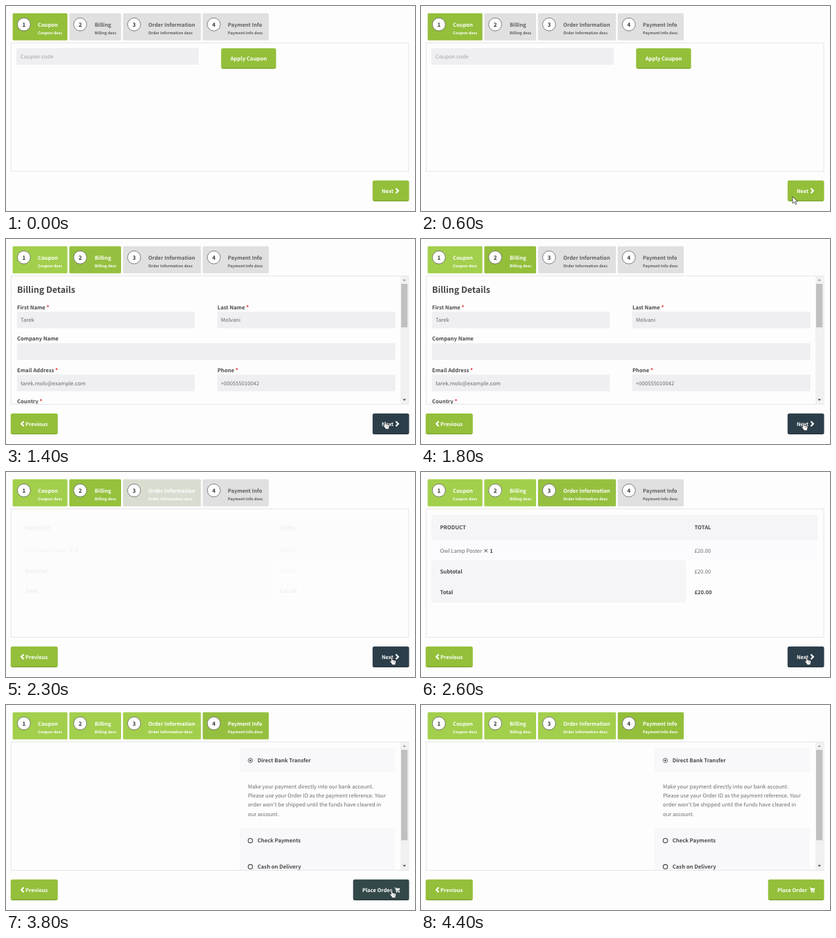
Recreate the animation shown at these times as an HTML page. Size 590 by 297 pixels, loop 5.1 s.

```html
<!DOCTYPE html>
<html lang="en">
<head>
<meta charset="utf-8">
<title>Checkout steps</title>
<style>
  html, body { margin: 0; width: 100%; height: 100%; overflow: hidden; background: #fefdfe; }
  svg { display: block; }
  text {
    font: 7.68px "Noto Sans CJK SC", "Noto Sans CJK JP", "Noto Sans CJK", "Open Sans", sans-serif;
    text-rendering: geometricPrecision; white-space: pre;
  }
  .b { font-weight: 700; }
  .k { font-weight: 900; }
</style>
</head>
<body>
<svg id="stage" width="590" height="297" viewBox="0 0 590 297"></svg>
<script>
const LOOP = 5100, TICK = 100;
const STARTS = [0, 1100, 2300, 3500];
const GREEN = [147, 191, 58], LIGHT = [162, 207, 76], GREY = [225, 224, 225], DARK = [43, 62, 74];
const INK = '#48484a', SOFT = '#6a6a6c';
const TABS = [
  [9.6, 79, 46, 25.8, 'Coupon'],
  [91.3, 74.7, 128, 107, 'Billing'],
  [168.8, 112.4, 205.3, 184.8, 'Order Information'],
  [283.8, 95.2, 320, 299.8, 'Payment Info']
];

const clamp = v => Math.max(0, Math.min(1, v));
const mix = (a, b, p) => `rgb(${a.map((v, i) => Math.round(v + (b[i] - v) * p))})`;
const rgb = c => `rgb(${c})`;
const rect = (x, y, w, h, fill, more = '') =>
  `<rect x="${x}" y="${y}" width="${w}" height="${h}" fill="${fill}" ${more}/>`;
// weight: '' regular, 'b' bold, 'k' black
const text = (x, y, s, fill, weight = '', size = 7.68, more = '') =>
  `<text x="${x}" y="${y}" fill="${fill}" class="${weight}" style="font-size:${size}px" ${more}>${s}</text>`;
const path = (d, fill, more = '') => `<path d="${d}" fill="${fill}" ${more}/>`;

// Piecewise linear value through [time, ...values] points
function along(points, t) {
  const i = points.findIndex(p => p[0] >= t);
  if (i < 0) return points.at(-1).slice(1);
  if (i === 0) return points[0].slice(1);
  const a = points[i - 1], b = points[i], k = (t - a[0]) / (b[0] - a[0]);
  return a.slice(1).map((v, j) => v + (b[j + 1] - v) * k);
}

function tab([x, w, tx, cx, title], i, step, p) {
  let fill = rgb(GREY);
  if (i < step - 1) fill = rgb(LIGHT);
  else if (i === step - 1) fill = mix(GREEN, LIGHT, p);
  else if (i === step) fill = mix(GREY, GREEN, p);
  const ink = i <= step ? '#fff' : '#5c5c5e';
  return rect(x, 10.6, w, 39.2, fill, 'rx="1.5"') +
    `<circle cx="${cx}" cy="26.7" r="9.4" fill="#fefefe" stroke="#626262" stroke-width=".8"/>` +
    text(cx, 29.5, i + 1, '#333', 'b', 8, 'text-anchor="middle"') +
    text(tx, 29.6, title, ink, 'k', 7.5) +
    text(tx, 40.7, title + ' desc', ink, 'k', 5.6);
}

function button(x, y, w, h, fill) {
  return rect(x, y, w, h, fill, 'rx="2.5"') +
    path(`M${x + 2} ${y + h - .6}h${w - 4}`, 'none', 'stroke="#000" stroke-opacity=".15" stroke-width="1.2"');
}

const chevron = (x, dir) =>
  path(`M${x} 264.2l${3.4 * dir} 3.5l${-3.4 * dir} 3.5`, 'none', 'stroke="#fff" stroke-width="2.2"');

const cart = () =>
  path('M560.5 265h1.6l1 4.6h4.4', 'none', 'stroke="#fff"') +
  path('M562.3 265.4h6l-.8 3.2h-4.6z', '#fff') +
  '<circle cx="563.6" cy="271" r=".9" fill="#fff"/><circle cx="567" cy="271" r=".9" fill="#fff"/>';

function scrollbar(h) {
  return rect(569, 54, 12, 185, '#f2f1f2') + rect(570, 65, 9.2, h, '#c0c0c1') +
    path('M572.3 60.5h4.8l-2.4-2.6z', '#999') + path('M572.3 231.8h4.8l-2.4 2.6z', '#555');
}

const coupon = () =>
  rect(15, 61, 263, 24, '#efeef0') + text(21, 76.2, 'Coupon code', '#a3a3a5') +
  button(310.3, 61.3, 79.3, 29.6, rgb(GREEN)) + text(323.7, 79.1, 'Apply Coupon', '#fff', 'b');

function field(x, y, w, label, value) {
  const star = value ? ' <tspan fill="#e02020">*</tspan>' : '';
  return text(x, y, label + star, INK, 'b') +
    rect(x - .3, y + 3.7, w, 24, '#efeef0') + text(x + 5, y + 18.7, value, SOFT);
}

const billing = () =>
  text(16, 78.3, 'Billing Details', '#444446', 'b', 12.4) +
  field(16, 101.7, 256.5, 'First Name', 'Tarek') +
  field(305, 101.7, 257, 'Last Name', 'Molvani') +
  field(16, 147.3, 546, 'Company Name', '') +
  field(16, 192.8, 256.5, 'Email Address', 'tarek.molv@example.com') +
  field(305, 192.8, 257, 'Phone', '+000555010042') +
  field(16, 238.4, 546, 'Country', ' ');

function order() {
  const row = (y, label, total, a, b) => text(27.5, y, label, INK, a) + text(394.5, y, total, b ? INK : SOFT, b);
  return rect(15, 62, 557, 36, '#f5f4f6') + rect(15, 98, 557, 30, '#fbfafc') +
    rect(15, 128, 367, 61, '#f5f4f6') +
    row(83, 'PRODUCT', 'TOTAL', 'b', 'b') +
    row(116.5, `<tspan fill="${SOFT}">Owl Lamp Poster</tspan> <tspan class="b">× 1</tspan>`, '£20.00', '', '') +
    row(146.8, 'Subtotal', '£20.00', 'b', '') +
    row(176.8, 'Total', '£20.00', 'b', 'b');
}

function option(y, label, on) {
  return `<circle cx="352.5" cy="${y}" r="3.2" fill="none" stroke="#444" stroke-width="${on ? .8 : 1.1}"/>` +
    (on ? `<circle cx="352.5" cy="${y}" r="1.4" fill="#555"/>` : '') +
    text(362.8, y + 2.9, label, INK, 'b');
}

const payment = () =>
  rect(337, 62, 224, 36, '#f8f7f9') + rect(337, 178, 224, 70, '#f8f7f9') +
  option(80.3, 'Direct Bank Transfer', true) +
  ['Make your payment directly into our bank account.',
   'Please use your Order ID as the payment reference. Your',
   "order won't be shipped until the funds have cleared in",
   'our account.'].map((s, i) => text(349, 120.7 + i * 13.35, s, SOFT)).join('') +
  option(196.4, 'Check Payments') + option(234.3, 'Cash on Delivery');

const PANELS = [coupon, billing, order, payment];

function cursor(t) {
  if (t < 600 || t >= 4300) return '';
  const [x, y] = along([[600, 536, 276], [900, 544, 265], [1000, 545.5, 264], [1300, 547, 264], [1700, 547, 264],
    [1900, 556.5, 268], [4000, 556.5, 268], [4100, 560, 258], [4200, 565, 244]], t);
  const hand = 'M-1 .8q1-1.5 2 0v3.4l4.4 1q1 .4.8 1.6l-.8 3.2v1.4h-5.2v-1.2l-3-3.4q-.6-1.3.8-1l1 .8z';
  const arrow = 'M0 0v10l2.4-2.2 1.8 3.8 1.6-.8-1.8-3.6h3.2z';
  const over = t >= 800 && t <= 4100;
  return `<g transform="translate(${x} ${y})">` +
    path(over ? hand : arrow, '#fff', 'stroke="#222" stroke-width=".7"') +
    (over ? path('M2.4 6v2M4 6.4v1.8', 'none', 'stroke="#444" stroke-width=".5"') : '') + '</g>';
}

function draw(t) {
  const step = STARTS.filter(s => s <= t).length - 1;
  const u = step ? (t - STARTS[step]) / TICK : 9;
  const p = clamp(.1 + u * .29), shown = clamp(.08 + u * .31);
  const [pivot, squash] = step === 2 ? [114, .965] : [53, .972];
  const sy = squash + (1 - squash) * shown;
  const hover = step < 3 ? clamp((t - 700) / 320)
    : t < 4100 ? clamp(.17 + u * .25) : clamp((4400 - t) / 400);
  const fill = mix(GREEN, DARK, hover);

  let out = TABS.map((d, i) => tab(d, i, step, p)).join('');
  out += rect(7.5, 53.5, 573.5, 186, 'none', 'stroke="#e6e5e7"');
  out += '<clipPath id="view"><rect x="8" y="54" width="573" height="185"/></clipPath>' +
    `<g clip-path="url(#view)"><g opacity="${shown}" transform="translate(0 ${pivot * (1 - sy)}) scale(1 ${sy})">` +
    PANELS[step]() + '</g></g>';
  if (step === 1) out += scrollbar(63);
  if (step === 3) out += scrollbar(131);
  if (step) out += button(6.7, 252.8, 68, 30.2, rgb(GREEN)) + chevron(25.6, -1) + text(28, 270.6, 'Previous', '#fff', 'k', 7.5);
  out += step < 3
    ? button(528.8, 252.8, 52.7, 30.2, fill) + text(542, 270.6, 'Next', '#fff', 'k', 7.5) + chevron(562.4, 1)
    : button(500.7, 252.8, 80.8, 30.2, fill) + text(514, 270.6, 'Place Order', '#fff', 'k', 7.5) + cart();
  return out + cursor(t);
}

const stage = document.getElementById('stage');
let last = -1;
function frame() {
  const t = Math.floor(performance.now() % LOOP / TICK) * TICK;
  if (t !== last) stage.innerHTML = draw(last = t);
  requestAnimationFrame(frame);
}
frame();
</script>
</body>
</html>
```
